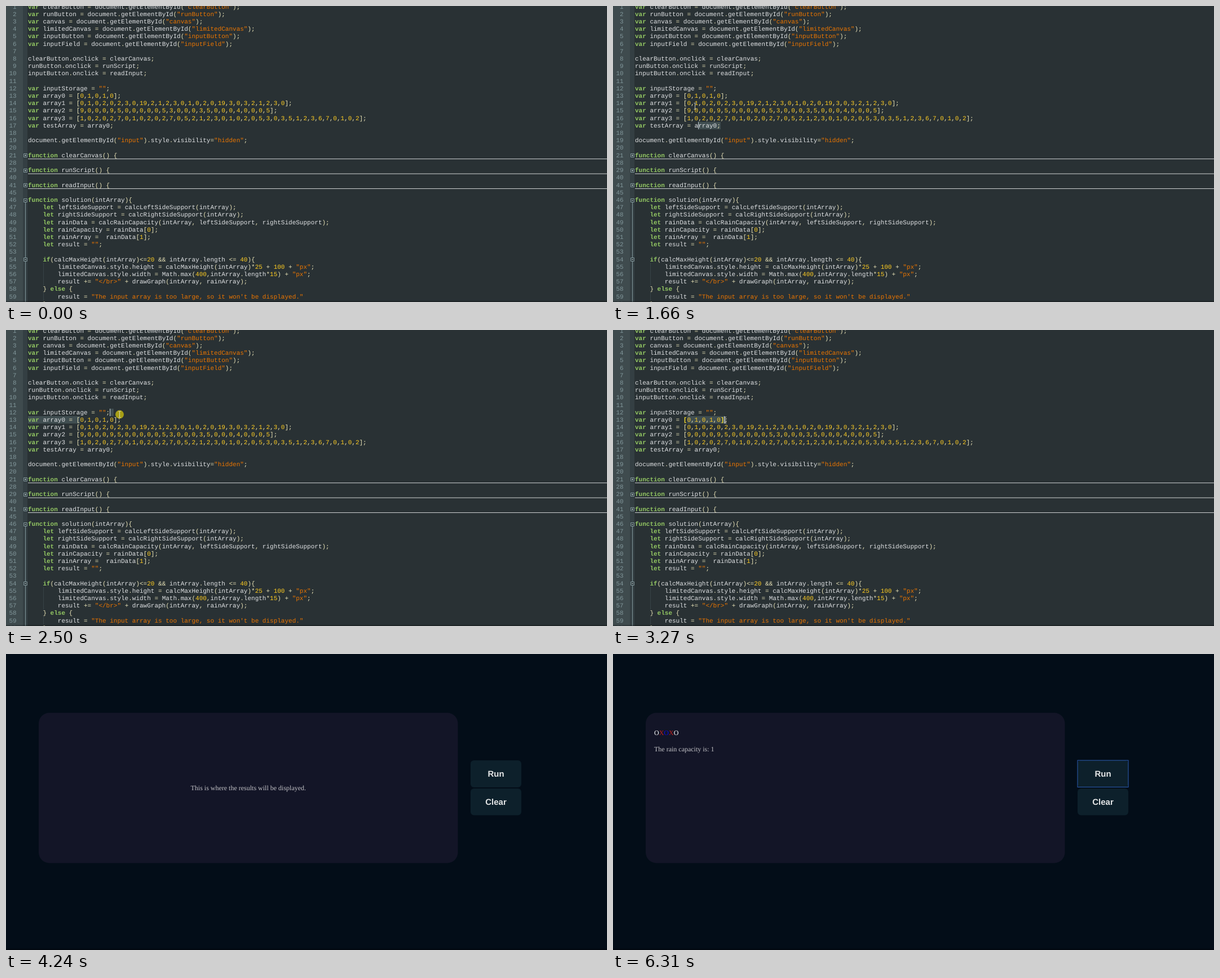
An HTML page for the animation above (8 s loop, 1066x526 px).

```html
<!DOCTYPE html>
<html lang="en">
<head>
<meta charset="utf-8">
<title>Rain capacity</title>
<style>
  html, body { margin: 0; width: 100%; height: 100%; overflow: hidden; background: #293134; }
  svg { display: block; width: 1066px; height: 526px; }
  text { text-rendering: geometricPrecision; white-space: pre; }
  #editor { font: 11px "Liberation Mono", "Courier New", monospace; fill: #e0e2e4; }
  .num { fill: #81969a; text-anchor: end; }
  .key { fill: #93c763; font-weight: bold; }
  .str { fill: #ec7600; }
  .dig { fill: #ffcd22; }
  .op { fill: #e8e2b7; }
  .match { fill: #f3db2e; font-weight: bold; }
  .serif { font: 12px "Liberation Serif", "Times New Roman", serif; fill: #c3c3c7; }
  .label { font: bold 15px "Liberation Sans", Arial, sans-serif; fill: #e3e5e6; text-anchor: middle; }
</style>
</head>
<body>
<svg viewBox="0 0 1066 526">
  <g id="editor">
    <rect width="1066" height="526" fill="#293134"/>
    <rect width="30" height="526" fill="#3f4b4e"/>
    <rect x="30" width="8" height="526" fill="#343f43"/>
    <g id="marks"></g>
    <g id="selection" fill="#404e51"></g>
    <g id="code"></g>
    <rect id="caret" width="1" height="13.2" fill="#c1cbd2"/>
    <rect y="524" width="1066" height="2" fill="#000" opacity=".25"/>
  </g>
  <g id="page">
    <rect width="1066" height="526" fill="#030d18"/>
    <rect x="58" y="104.5" width="743.5" height="267" rx="19" fill="#131527"/>
    <text id="hint" class="serif" x="429.8" y="242" text-anchor="middle">This is where the results will be displayed.</text>
    <g id="result" class="serif">
      <text x="73" y="144" fill="#fff">O<tspan fill="#b8201e">X</tspan><tspan fill="#0c0cdc">O</tspan><tspan fill="#b8201e">X</tspan>O</text>
      <text x="73" y="172.5">The rain capacity is: 1</text>
    </g>
    <rect id="run" x="824" y="189" width="90" height="48" rx="6"/>
    <rect id="focus" x="824" y="189" width="90" height="47.5" fill="none" stroke="#2c5fb4"/>
    <text id="runLabel" class="label" x="869" y="218">Run</text>
    <rect x="824" y="239" width="90" height="47.5" rx="6" fill="#0d202b"/>
    <text class="label" x="869" y="268">Clear</text>
    <rect y="523.5" width="1066" height="2.5" fill="#000" opacity=".35"/>
  </g>
  <g id="mouse">
    <circle id="press" r="7.5" fill="#b5ab12" opacity=".9"/>
    <path id="beam" d="M-2-5.5H-.5L0-5 .5-5.5H2M0-5V5M-2 5.5H-.5L0 5 .5 5.5H2" fill="none" stroke="#d5d8d2" stroke-width=".9"/>
    <path id="arrow" d="M0 0V12.5L2.9 9.8 4.8 14 6.6 13.2 4.7 9.2H8.6Z" fill="#fff" stroke="#000" stroke-width=".6"/>
    <path id="hand" d="M-1.2.8Q0-.7 1.2.8V5Q2.3 4.2 3 5.4 4.3 4.7 4.9 6 6.4 5.6 6.5 7.4V10Q6.4 12 5.3 13.8H-1.2Q-1.8 12-4.2 8.9-4.5 7.3-3 7.4L-1.2 9Z" fill="#fff" stroke="#000" stroke-width=".7"/>
  </g>
</svg>
<script>
const LOOP = 8000, LEFT = 39, CHAR = 6.601, ROW = 13.21, PAGE_AT = 4240;

const source = `var clearButton = document.getElementById("clearButton");
var runButton = document.getElementById("runButton");
var canvas = document.getElementById("canvas");
var limitedCanvas = document.getElementById("limitedCanvas");
var inputButton = document.getElementById("inputButton");
var inputField = document.getElementById("inputField");

clearButton.onclick = clearCanvas;
runButton.onclick = runScript;
inputButton.onclick = readInput;

var inputStorage = "";
var array0 = [0,1,0,1,0];
var array1 = [0,1,0,2,0,2,3,0,19,2,1,2,3,0,1,0,2,0,19,3,0,3,2,1,2,3,0];
var array2 = [9,0,0,0,9,5,0,0,0,0,0,5,3,0,0,0,3,5,0,0,0,4,0,0,0,5];
var array3 = [1,0,2,0,2,7,0,1,0,2,0,2,7,0,5,2,1,2,3,0,1,0,2,0,5,3,0,3,5,1,2,3,6,7,0,1,0,2];
var testArray = array0;

document.getElementById("input").style.visibility="hidden";

function clearCanvas() {

function runScript() {

function readInput() {

function solution(intArray){
    let leftSideSupport = calcLeftSideSupport(intArray);
    let rightSideSupport = calcRightSideSupport(intArray);
    let rainData = calcRainCapacity(intArray, leftSideSupport, rightSideSupport);
    let rainCapacity = rainData[0];
    let rainArray =  rainData[1];
    let result = "";

    if(calcMaxHeight(intArray)<=20 && intArray.length <= 40){
        limitedCanvas.style.height = calcMaxHeight(intArray)*25 + 100 + "px";
        limitedCanvas.style.width = Math.max(400,intArray.length*15) + "px";
        result += "</br>" + drawGraph(intArray, rainArray);
    } else {
        result = "The input array is too large, so it won't be displayed."
    }`;
const lines = source.split("\n");

const $ = id => document.getElementById(id);
const show = (id, on) => $(id).setAttribute("visibility", on ? "visible" : "hidden");
const colX = col => LEFT + col * CHAR;
const rowY = row => (row - 1) * ROW - 5.5;

function add(parent, tag, attrs, text = "") {
  const el = document.createElementNS("http://www.w3.org/2000/svg", tag);
  for (const k in attrs) el.setAttribute(k, attrs[k]);
  el.textContent = text;
  return parent.appendChild(el);
}

// Folded blocks hide some line numbers.
function lineNumber(row) {
  if (row <= 21) return row;
  return [28, 29, 40, 41, 45][row - 22] || row + 19;
}

function tokenClass(s) {
  if (/^(var|let|function|if|else)$/.test(s)) return "key";
  if (s[0] === '"') return "str";
  if (/^\d/.test(s)) return "dig";
  return /^\w/.test(s) ? "" : "op";
}

const braces = [];
lines.forEach((line, i) => {
  const row = i + 1, y = rowY(row) + 10;
  add($("code"), "text", { x: 18.7, y, class: "num" }, lineNumber(row));
  const text = add($("code"), "text", { y });
  for (const m of line.matchAll(/"[^"]*"|[A-Za-z_]\w*|\d+|[[\]]|[^\w\s"[\]]+/g)) {
    const span = add(text, "tspan", { x: colX(m.index), class: tokenClass(m[0]) }, m[0]);
    if (row === 13 && /[[\]]/.test(m[0])) braces.push(span);
  }
});

// Fold boxes, rules under folded blocks, indent guides.
const line = (d, stroke, extra) => add($("marks"), "path", { d, stroke, fill: "none", ...extra });
line("M34.5 348V526", "#81969a");
line("M66.5 457V496M66.5 510V523", "#46545a", { "stroke-dasharray": "1 1" });
for (const row of [21, 23, 25, 27, 35]) {
  const y = Math.round(rowY(row) + 6.6) + .5, folded = row < 27;
  line(`M31.5 ${y - 3}h6v6h-6z`, "#81969a", { fill: "#343f43" });
  line(`M33 ${y}h3` + (folded ? `M34.5 ${y - 1.5}v3` : ""), "#a5b5b8");
  if (folded) line(`M${LEFT} ${rowY(row + 1) - .2}H1066`, "#d0d4d5");
}

// Pointer path: time, x, y. It is hidden between the three trips.
const trips = [
  [[70, 905, 518], [680, 190, 213], [860, 190, 213], [1330, 149, 213], [1480, 149, 213],
   [1660, 145.5, 178], [2270, 131, 161], [2300, 131, 161], [2500, 201.5, 150],
   [2720, 201.5, 150], [2810, 199, 160], [3270, 199, 160], [3600, 445, 505]],
  [[4390, 470, 490], [4800, 850, 219], [5950, 850, 219], [6310, 450, 524]]
];
const presses = [[860, 1330], [2300, 3270], [4920, 5050]];

function pointer(t) {
  const trip = trips.find(k => t >= k[0][0] && t < k[k.length - 1][0]);
  if (!trip) return null;
  const i = trip.findIndex(k => k[0] > t);
  const [t0, x0, y0] = trip[i - 1], [t1, x1, y1] = trip[i];
  const u = (t - t0) / (t1 - t0), e = u * u * (3 - 2 * u);
  return { x: x0 + (x1 - x0) * e, y: y0 + (y1 - y0) * e };
}

// Text position under the pointer.
function headAt(t) {
  const p = pointer(t);
  const row = Math.floor((p.y + 5.5) / ROW) + 1;
  const col = Math.round((p.x - LEFT) / CHAR);
  return { row, col: Math.min(col, lines[row - 1].length) };
}

function drawEditor(t) {
  const box = $("selection");
  box.textContent = "";
  const second = t >= 2300, active = t >= 860;
  let lit = false;
  if (active) {
    const anchor = second ? { row: 13, col: 14 } : { row: 17, col: 23 };
    const head = headAt(Math.min(t, second ? 3269 : 1330));
    const [a, b] = [anchor, head].sort((p, q) => p.row - q.row || p.col - q.col);
    for (let r = a.row; r <= b.row; r++) {
      const from = r === a.row ? a.col : 0;
      const to = r === b.row ? b.col : lines[r - 1].length + 1;
      add(box, "rect", { x: colX(from), y: rowY(r), width: (to - from) * CHAR, height: ROW });
    }
    lit = head.row === 13 && [13, 14, 23, 24].includes(head.col);
    $("caret").setAttribute("x", Math.floor(colX(head.col)));
    $("caret").setAttribute("y", rowY(head.row));
  }
  const idle = Math.max(0, t - (second ? 2810 : 1330));
  show("caret", active && Math.floor(idle / 560) % 2 === 0);
  braces.forEach(b => b.setAttribute("class", lit ? "match" : "op"));
}

function drawPage(t, hover) {
  const done = t >= 5050;
  show("hint", !done);
  show("result", done);
  show("focus", t >= 4920);
  $("run").setAttribute("fill", hover ? "#1c3d52" : "#0d202b");
  $("runLabel").style.fill = hover ? "#fff" : "";
}

function draw(t) {
  const onPage = t >= PAGE_AT, p = pointer(t);
  const hover = onPage && p && p.x > 824 && p.x < 914 && p.y > 189 && p.y < 237;
  $("editor").style.display = onPage ? "none" : "";
  $("page").style.display = onPage ? "" : "none";
  if (onPage) drawPage(t, hover);
  else drawEditor(t);

  $("mouse").style.display = p ? "" : "none";
  if (!p) return;
  $("mouse").setAttribute("transform", `translate(${p.x} ${p.y})`);
  show("press", presses.some(([a, b]) => t >= a && t < b));
  show("beam", !onPage);
  show("arrow", onPage && !hover);
  show("hand", hover);
}

const start = performance.now();
function tick() {
  draw((performance.now() - start) % LOOP);
  requestAnimationFrame(tick);
}
tick();
</script>
</body>
</html>
```
